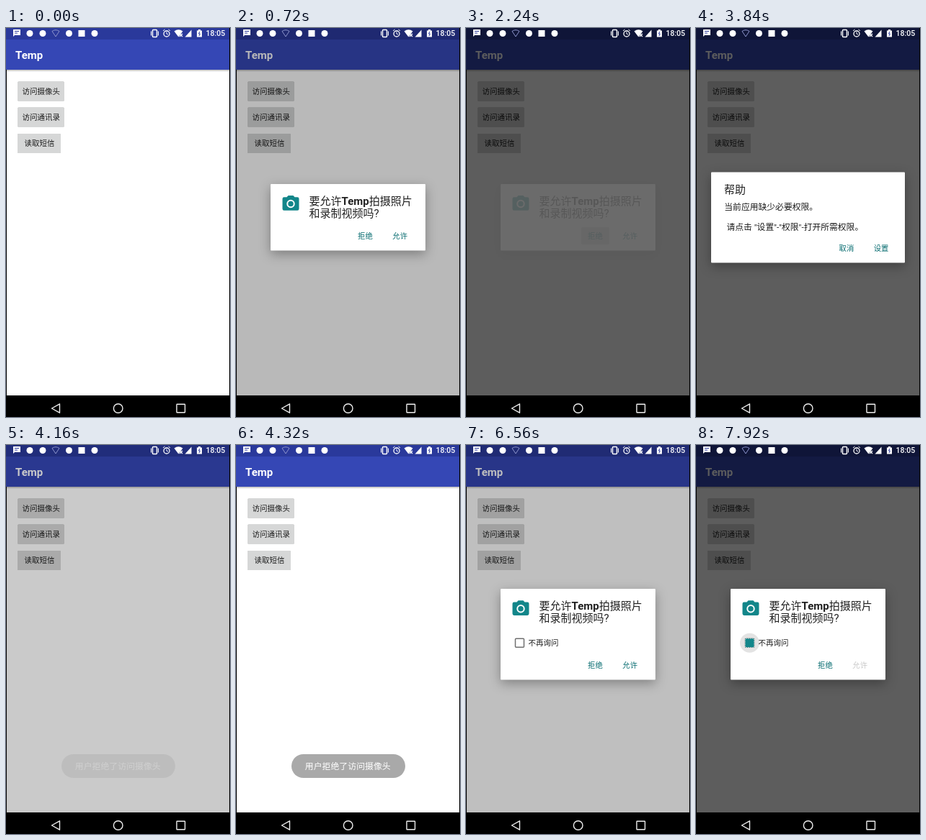
These frames come from a looping animation (311x541 px, 8000 ms). An HTML page:

```html
<!DOCTYPE html>
<html lang="zh-CN">
<head>
<meta charset="utf-8">
<title>Temp</title>
<style>
  html, body { margin: 0; width: 100%; height: 100%; overflow: hidden; background: #000; }
  svg { display: block; width: 311px; height: 541px; }
  text { font-family: Roboto, "Noto Sans CJK SC", "Noto Sans CJK", sans-serif; white-space: pre; }
  .bold { font-weight: 700; }
  .label { font-size: 10.5px; font-weight: 500; fill: #1c1c1c; }
  .title { font-size: 15px; fill: #212121; }
  .body { font-size: 11.8px; fill: #1c1c1c; }
  .action { font-size: 10.4px; font-weight: 500; fill: #076c70; }
  .key { fill: #d6d7d7; filter: drop-shadow(0 .5px .7px rgba(0, 0, 0, .3)); }
  .panel { fill: #fff; filter: drop-shadow(0 5px 8px rgba(0, 0, 0, .32)); }

  /* One percent of the loop is 80 ms. */
  .anim { animation: 8s linear infinite; transform-box: fill-box; transform-origin: center; }
  .dim { animation-name: dim; }
  .ask { animation-name: ask; }
  .help { animation-name: help; }
  .askAgain { animation-name: askAgain; }
  .toast { animation-name: toast; }
  .tap { animation-name: tap; }
  .deny { animation-name: deny; }
  .cancel { animation-name: cancel; }
  .halo { animation-name: halo; }
  .tick { animation-name: tick; }
  .allow { animation-name: allow; }

  @keyframes dim {
    0%, 7.5% { opacity: 0; }
    11%, 50% { opacity: .635; }
    53%, 80.6% { opacity: 0; }
    84.2%, 100% { opacity: .635; }
  }
  @keyframes ask {
    0%, 6.8% { opacity: 0; transform: scale(.9); }
    8.8%, 26.2% { opacity: 1; transform: none; }
    28.2%, 100% { opacity: 0; transform: none; }
  }
  @keyframes help {
    0%, 28.3% { opacity: 0; transform: scale(.92); }
    31%, 49.5% { opacity: 1; transform: none; }
    51.5%, 100% { opacity: 0; transform: none; }
  }
  @keyframes askAgain {
    0%, 79% { opacity: 0; transform: scale(.9); }
    81.8%, 100% { opacity: 1; transform: none; }
  }
  @keyframes toast {
    0%, 51.5% { opacity: 0; }
    56.5%, 76% { opacity: 1; }
    80%, 100% { opacity: 0; }
  }
  @keyframes tap {
    0%, 1% { opacity: 0; transform: scale(.1); }
    2% { opacity: .2; transform: scale(.4); }
    5% { opacity: .2; transform: none; }
    8% { opacity: 0; transform: none; }
    8.1%, 75% { opacity: 0; transform: scale(.1); }
    76% { opacity: .2; transform: scale(.4); }
    78.5% { opacity: .2; transform: none; }
    81.5%, 100% { opacity: 0; transform: none; }
  }
  @keyframes deny {
    0%, 24.9% { opacity: 0; }
    26%, 28.5% { opacity: .2; }
    30%, 100% { opacity: 0; }
  }
  @keyframes cancel {
    0%, 48.1% { opacity: 0; }
    49.2%, 51% { opacity: .2; }
    52%, 100% { opacity: 0; }
  }
  @keyframes halo {
    0%, 96.5% { opacity: 0; transform: scale(.3); }
    98.5%, 100% { opacity: 1; transform: none; }
  }
  @keyframes tick {
    0%, 97.9% { opacity: 0; }
    98%, 100% { opacity: 1; }
  }
  @keyframes allow {
    0%, 97.9% { fill: #076c70; }
    98%, 100% { fill: #c8c8c8; }
  }
</style>
</head>
<body>
<svg viewBox="0 0 311 541">
  <defs>
    <clipPath id="firstKey"><rect x="16" y="74.5" width="65" height="27" rx="1.5"/></clipPath>
    <linearGradient id="barShadow" x2="0" y2="1">
      <stop stop-color="#000" stop-opacity=".28"/>
      <stop offset="1" stop-color="#000" stop-opacity="0"/>
    </linearGradient>
    <g id="question">
      <g transform="translate(62.2 230.7) scale(1.15)">
        <path fill="#12868a" d="M9 2L7.2 4H4Q2 4 2 6V18Q2 20 4 20H20Q22 20 22 18V6Q22 4 20 4H16.8L15 2Z"/>
        <circle cx="12" cy="12" r="4.1" fill="none" stroke="#fff" stroke-width="1.7"/>
      </g>
      <text class="title" x="101.5" y="246.3">要允许<tspan class="bold">Temp</tspan>拍摄照片</text>
      <text class="title" x="101.5" y="263.3">和录制视频吗?</text>
    </g>
  </defs>

  <!-- App -->
  <rect x="1" width="309" height="511" fill="#fff"/>
  <rect width="310" height="16" fill="#2a399b"/>
  <rect y="16" width="310" height="42" fill="#3547b5"/>
  <rect x="1" y="58" width="309" height="3" fill="url(#barShadow)"/>
  <text class="bold" x="13" y="42.7" font-size="15" fill="#fff">Temp</text>
  <rect class="key" x="16" y="74.5" width="65" height="27" rx="1.5"/>
  <rect class="key" x="16" y="110.5" width="65" height="27" rx="1.5"/>
  <rect class="key" x="16" y="147" width="60" height="27" rx="1.5"/>
  <g clip-path="url(#firstKey)"><circle class="anim tap" cx="49" cy="88" r="36"/></g>
  <g class="label">
    <text x="22.5" y="92">访问摄像头</text>
    <text x="22.5" y="128.2">访问通讯录</text>
    <text x="25.5" y="164.2">读取短信</text>
  </g>

  <rect class="anim dim" width="310" height="511"/>

  <!-- Dialogs -->
  <g class="anim ask">
    <rect class="panel" x="48" y="217" width="215" height="92.5" rx="1"/>
    <use href="#question"/>
    <rect class="anim deny" x="160" y="277" width="39" height="24" rx="2"/>
    <text class="action" x="169" y="293">拒绝</text>
    <text class="action" x="217.3" y="293">允许</text>
  </g>

  <g class="anim help">
    <rect class="panel" x="21" y="200.5" width="269" height="126" rx="1"/>
    <text class="title" x="39" y="229.7">帮助</text>
    <text class="body" x="39.3" y="252.8">当前应用缺少必要权限。</text>
    <text class="body" x="42.5" y="280.7">请点击 "设置"-"权限"-打开所需权限。</text>
    <rect class="anim cancel" x="189" y="294" width="39" height="24" rx="2"/>
    <text class="action" x="198.5" y="309.7">取消</text>
    <text class="action" x="246.7" y="309.7">设置</text>
  </g>

  <g class="anim askAgain">
    <rect class="panel" x="48" y="200" width="215" height="126.5" rx="1"/>
    <use href="#question" y="-16.8"/>
    <circle class="anim halo" cx="74.5" cy="275.3" r="13.5" fill="#e3e3e3"/>
    <rect x="68.5" y="269.3" width="12" height="12" rx="1" fill="none" stroke="#707070" stroke-width="1.5"/>
    <rect class="anim tick" x="68.2" y="269" width="12.6" height="12.6" rx="1" fill="#12868a" stroke="#e3e3e3" stroke-dasharray="1.5"/>
    <text class="label" x="86.5" y="279.2">不再询问</text>
    <text class="action" x="169" y="309.7">拒绝</text>
    <text class="action anim allow" x="217.3" y="309.7">允许</text>
  </g>

  <g class="anim toast">
    <rect x="77" y="430" width="158" height="33" rx="16.5" fill="#565656"/>
    <text x="95.8" y="451.2" font-size="11.9" fill="#fff">用户拒绝了访问摄像头</text>
  </g>

  <!-- Status bar -->
  <g fill="#fff">
    <path d="M10 2H20V10H12L10 12Z"/>
    <path d="M12 4.5H18M12 7H16" stroke="#2a399b"/>
    <circle cx="33" cy="7.5" r="4.5"/>
    <circle cx="51" cy="7.5" r="4.5"/>
    <path d="M64 4.5Q69 1 74 4.5L69 12Z" fill="none" stroke="#8d95cc"/>
    <circle cx="87.5" cy="7.5" r="4.5"/>
    <rect x="100.5" y="3" width="9" height="9"/>
    <circle cx="123" cy="7.5" r="4.5"/>
    <rect x="203.5" y="2.5" width="6" height="10" rx="1" fill="none" stroke="#fff" stroke-width="1.5"/>
    <path d="M201.5 4.5V10.5M211.5 4.5V10.5" stroke="#fff"/>
    <circle cx="223" cy="8" r="4" fill="none" stroke="#fff" stroke-width="1.3"/>
    <path d="M223 5.5V8L225 9.2M218 4L220.5 2M228 4L225.5 2" fill="none" stroke="#fff"/>
    <path d="M233.5 4.5Q239.5 0 245.5 4.5L239.5 12.5Z"/>
    <path d="M241 8L245 12M245 8L241 12" stroke="#fff" stroke-width="1.3"/>
    <path d="M248.5 12.5L257.5 2.5V12.5Z"/>
    <path d="M265 3.5H267V2H270V3.5H272V12.5H265Z"/>
    <path d="M269 5L267.5 8H269.5L268 11" fill="none" stroke="#2a399b"/>
    <text x="277.5" y="11.3" font-size="10.6" font-weight="500">18:05</text>
  </g>

  <!-- Navigation bar -->
  <rect y="511" width="311" height="30"/>
  <g fill="none" stroke="#eee" stroke-width="1.4">
    <path d="M74.5 522.8V535.2L63.5 529Z" stroke-linejoin="round"/>
    <circle cx="155.7" cy="529" r="6.3"/>
    <rect x="237" y="523.3" width="11.5" height="11.5" rx=".5"/>
  </g>
</svg>
</body>
</html>
```
